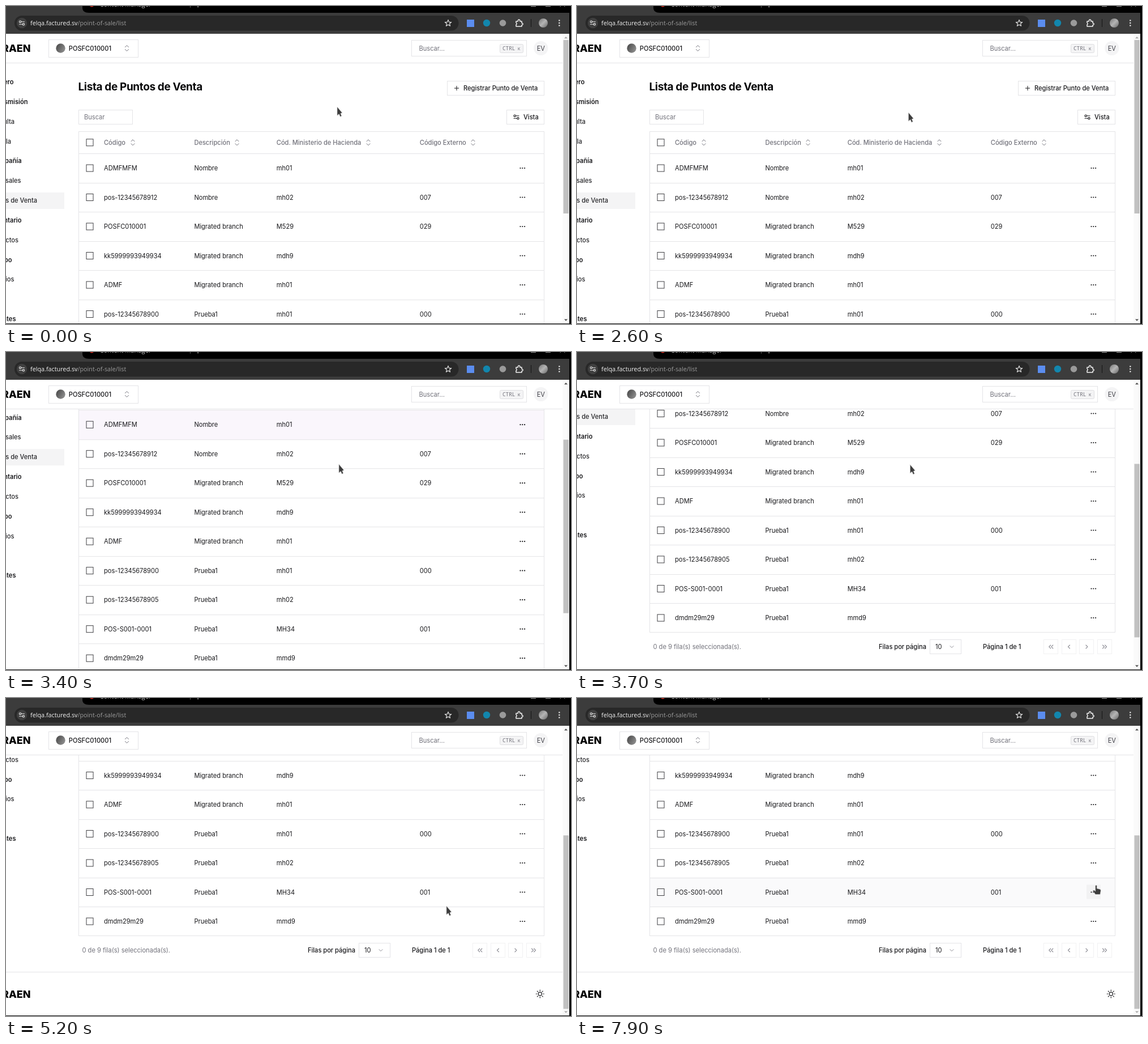
An HTML page for the animation above (8 s loop, 998 by 561 pixels).

```html
<!DOCTYPE html>
<html lang="es">
<head>
<meta charset="utf-8">
<title>Lista de Puntos de Venta</title>
<style>
  html, body { margin: 0; width: 100%; height: 100%; overflow: hidden; background: #fff; }
  svg { display: block; width: 998px; height: 561px; }
  text { font-family: Inter, "Liberation Sans", sans-serif; font-optical-sizing: none; white-space: pre; }
</style>
</head>
<body>
<svg id="stage" viewBox="0 0 998 561" xmlns="http://www.w3.org/2000/svg">
  <defs>
    <clipPath id="view"><rect y="100" width="983" height="460"/></clipPath>
    <linearGradient id="ball" x2="1" y2=".6"><stop stop-color="#444"/><stop offset="1" stop-color="#8c8c8c"/></linearGradient>
    <linearGradient id="photo" x2="1" y2="1"><stop stop-color="#777"/><stop offset=".5" stop-color="#b4b4b4"/><stop offset="1" stop-color="#666"/></linearGradient>
  </defs>
  <rect width="998" height="561" fill="#fff"/>
  <g clip-path="url(#view)"><g id="page"></g></g>
  <g id="header"></g>
  <g id="bar"></g>
  <g id="browser"></g>
  <g id="arrow"><path d="M0 0V15.2L3.3 12.4L5.4 17.2L7.8 16.1L5.9 11.6L8.9 10.6Z" fill="#3c3c3c" stroke="#d0d0d0" stroke-width=".6"/></g>
  <g id="hand"><path d="M-1.3 1.2Q0-.8 1.3 1.2V6L7 7.4Q8.4 8 8.2 10L7 16.5H-1.2L-5.6 10.6Q-5.4 8.6-3.4 9.2L-1.3 11Z" fill="#3c3c3c" stroke="#d0d0d0" stroke-width=".6"/></g>
</svg>
<script>
const NS = 'http://www.w3.org/2000/svg';
const $ = id => document.getElementById(id);
const INK = '#18181b', MUTED = '#71717a', FAINT = '#8e8e96', LINE = '#e4e4e7', SIZE = 11.09;
const LOOP = 8000, STEP = 100;
let layer;

function add(tag, attrs, str) {
  const el = document.createElementNS(NS, tag);
  for (const k in attrs) el.setAttribute(k, attrs[k]);
  if (str !== undefined) el.textContent = str;
  return layer.appendChild(el);
}
// Text placed by the middle of its capitals
function text(x, mid, str, { size = SIZE, fill = INK, weight = 400, anchor = 'start', ...rest } = {}) {
  return add('text', { x, y: mid + size * 0.364, 'font-size': size, fill, 'font-weight': weight, 'text-anchor': anchor, ...rest }, str);
}
const rect = (x, y, width, height, fill, rx = 0) => add('rect', { x, y, width, height, fill, rx });
const box = (x, y, width, height, stroke = LINE, fill = '#fff', rx = 0) =>
  add('rect', { x: x + .5, y: y + .5, width: width - 1, height: height - 1, fill, stroke, rx });
const disc = (cx, cy, r, fill) => add('circle', { cx, cy, r, fill });
const line = (d, stroke = INK, width = 1) =>
  add('path', { d, fill: 'none', stroke, 'stroke-width': width, 'stroke-linecap': 'round', 'stroke-linejoin': 'round' });
const sorter = (x, y) => line(`M${x - 3} ${y - 2}l3-3l3 3M${x - 3} ${y + 2}l3 3l3-3`, MUTED);
const sliders = (x, y, color) => {
  line(`M${x - 1} ${y - 2.3}h5.5M${x - 4.5} ${y + 2.3}h5.5`, color, 1.1);
  for (const s of [-1, 1]) add('circle', { cx: x + 2.9 * s, cy: y + 2.3 * s, r: 1.7, fill: 'none', stroke: color, 'stroke-width': 1.1 });
};
const wordmark = mid => text(43.5, mid, 'LUMBRAEN', { size: 18, weight: 800, anchor: 'end', fill: '#000' });

// Page, scrolls under the header
const ROW_TOP = 260.5, ROW = 51.5, COLS = [173, 332.4, 477.8, 730.8];
const rows = [
  ['ADMFMFM', 'Nombre', 'mh01', ''],
  ['pos-12345678912', 'Nombre', 'mh02', '007'],
  ['POSFC010001', 'Migrated branch', 'M529', '029'],
  ['kk5999993949934', 'Migrated branch', 'mdh9', ''],
  ['ADMF', 'Migrated branch', 'mh01', ''],
  ['pos-12345678900', 'Prueba1', 'mh01', '000'],
  ['pos-12345678905', 'Prueba1', 'mh02', ''],
  ['POS-S001-0001', 'Prueba1', 'MH34', '001'],
  ['dmdm29m29', 'Prueba1', 'mmd9', '']
];
const nav = [
  ['Tablero', 13.5, 1], ['Transmisión', 38.5, 1], ['Consulta', 15], ['Plantilla', 9], ['Compañía', 27.5, 1],
  ['Sucursales', 26.5], ['Puntos de Venta', 55], ['Inventario', 27.5, 1], ['Productos', 22], ['Equipo', 10.5, 1],
  ['Servicios', 14.5], ['', 0], ['Clientes', 17.5, 1]
];

layer = $('page');
rect(0, 329, 103, 29, '#f4f4f5');
nav.forEach(([name, right, strong], i) =>
  text(right, 134 + 34.83 * i, name, { weight: strong ? 600 : 500, anchor: 'end', fill: strong ? INK : '#27272a' }));

text(127.5, 142, 'Lista de Puntos de Venta', { size: 19, weight: 700, 'letter-spacing': '-.02em', fill: '#09090b' });
box(779, 132, 172, 26);
line('M792.3 145h7.4M796 141.3v7.4');
text(808, 145, 'Registrar Punto de Venta', { weight: 500 });
box(128, 183, 96, 26);
text(138, 196.3, 'Buscar', { fill: MUTED });
box(884, 183, 67, 26);
sliders(901.5, 196, INK);
text(914, 196, 'Vista', { weight: 500 });

const hover = rect(129, 0, 822, ROW, '#fafafa');
const hotButton = rect(900, 329.5 + 304, 25, 25, '#f2f2f3');
const check = y => box(141.5, y - 6.5, 13, 13, '#3f3f42', 'none');
check(240.8);
[['Código', 224], ['Descripción', 408], ['Cód. Ministerio de Hacienda', 640], ['Código Externo', 825]].forEach(([name, x], i) => {
  text(COLS[i], 240.8, name, { weight: 500, fill: MUTED });
  sorter(x, 240.8);
});
rows.forEach((cells, i) => {
  const y = 286 + ROW * i;
  rect(128, Math.round(ROW_TOP + ROW * i - .4), 823, 1, LINE);
  check(y);
  cells.forEach((c, k) => text(COLS[k], y, c));
  for (const d of [-3.8, 0, 3.8]) disc(912.3 + d, y, 1.1, INK);
});
box(128, 221, 823, 503, LINE, 'none');

text(134.5, 749, '0 de 9 fila(s) seleccionada(s).', { fill: MUTED });
text(533, 749, 'Filas por página', { weight: 500 });
box(623, 736, 56, 26);
text(633, 749, '10');
line('M659 747.6l3 3l3-3', FAINT);
text(717, 749, 'Página 1 de 1', { weight: 500 });
[837.3, 869, 900.4, 932].forEach((x, i) => {
  box(Math.round(x - 13), 736, 26, 26, '#f1f1f2');
  const s = i < 2 ? 1 : -1;
  const shifts = i % 3 ? [0] : [-2, 2];
  for (const d of shifts) line(`M${x + d + 1.5 * s} 746l${-3 * s} 3l${3 * s} 3`, FAINT, 1.1);
});
rect(0, 787, 983, 1, LINE);
wordmark(826);
add('circle', { cx: 943.3, cy: 826, r: 3.1, fill: 'none', stroke: INK, 'stroke-width': 1.2 });
for (let i = 0; i < 8; i++) {
  const c = Math.cos(i * Math.PI / 4), s = Math.sin(i * Math.PI / 4);
  line(`M${943.3 + 5.6 * c} ${826 + 5.6 * s}L${943.3 + 7 * c} ${826 + 7 * s}`, INK, 1.2);
}

// Fixed header
layer = $('header');
rect(0, 49, 983, 51, '#fff');
rect(0, 100, 983, 1, LINE);
wordmark(74.7);
box(75, 59, 159, 32);
disc(96.5, 74.5, 8.2, 'url(#ball)');
text(110.8, 74.5, 'POSFC010001', { weight: 500 });
sorter(213.5, 74.5);
box(716, 60, 204, 29);
text(729.5, 74.5, 'Buscar...', { fill: MUTED });
box(872, 67, 42, 16, '#dedee1', '#f4f4f5', 2);
const mono = { weight: 500, fill: MUTED, style: 'font-family:"Noto Sans Mono","DejaVu Sans Mono",monospace' };
text(877, 74.8, 'CTRL', { size: 9.3, ...mono });
text(904, 74.8, 'K', { size: 7.6, ...mono });
disc(944.8, 74.5, 12.6, '#f4f4f5');
text(944.8, 74.5, 'EV', { anchor: 'middle', fill: '#3f3f46' });

// Scrollbar
layer = $('bar');
rect(983, 49, 12, 511, '#fafafa');
const thumb = rect(984.5, 60, 9.5, 306, '#c1c1c1');
const up = add('path', { d: 'M986 57.3l3-3.4l3 3.4z' });
const down = add('path', { d: 'M986 552.4l3 3.4l3-3.4z' });

// Browser frame
layer = $('browser');
rect(0, 0, 998, 49, '#3c3c3c');
add('path', { d: 'M135 0H998V12H147Q135 12 135 3Z', fill: '#000' });
const ui = { size: 11.2, fill: '#c8c8c8', style: 'font-family:"Open Sans","Noto Sans",sans-serif' };
text(23, -3.6, 'Lumbraen', { ...ui, anchor: 'end' });
text(165.5, -2.6, 'Content Manager', ui);
disc(151.5, -1.8, 3.6, '#c5281c');
rect(325, 0, 1, 3, '#555');
rect(338.5, 0, 1.2, 2.5, '#bbb');
for (const x of [931, 957]) rect(x - 4, 0, 9, 1, '#999');
line('M979 1l2-2M987 1l-2-2', '#999');
rect(15, 17, 784.5, 26.5, '#282828', 13.2);
disc(28, 30, 9.2, '#3f3f3f');
sliders(28, 30, '#e3e3e3');
const addr = text(43, 30, '', { ...ui, size: 10.8, fill: '#9b9b9b' });
layer = addr;
add('tspan', { fill: '#f1f1f1' }, 'felqa.factured.sv');
add('tspan', {}, '/point-of-sale/list');
layer = $('browser');
let star = '';
for (let i = 0; i < 10; i++) {
  const r = i % 2 ? 2.6 : 6, a = i * Math.PI / 5;
  star += `${i ? 'L' : 'M'}${781 + r * Math.sin(a)} ${30.4 - r * Math.cos(a)}`;
}
line(star + 'Z', '#dedede', 1.2);
rect(814, 24, 13, 13, '#5b8def');
disc(849, 30, 6.2, '#1286ad');
disc(877.5, 30, 5.8, '#9a9a9a');
line('M901 27h3.4v-1.3a1.7 1.7 0 0 1 3.4 0V27H911v3.2h.5a1.6 1.6 0 0 1 0 3.2H911V36H901v-3a2 2 0 0 0 0-3.6Z', '#f0f0f0', 1.5);
rect(927, 23, 1, 14, '#161616');
disc(949, 30, 8, 'url(#photo)');
for (const d of [-4.5, 0, 4.5]) disc(977.3, 30 + d, 1.3, '#e3e3e3');
rect(995, 0, 3, 561, '#000');
rect(0, 560, 998, 1, '#111');

// Motion: [ms, values...]
const scrollKeys = [
  [2600, 0], [2700, 8], [2800, 29], [2900, 52], [3000, 74.5], [3400, 157.8], [3700, 229],
  [3900, 275], [4000, 293], [4100, 302.5], [4200, 304]
];
const mouseKeys = [
  [0, 585, 178], [2000, 585, 181], [2600, 585.5, 188], [3000, 587, 193], [3400, 588, 198], [4100, 589, 199.5],
  [4600, 589, 200], [4800, 628, 236], [5000, 704, 308], [5200, 778, 367], [5400, 880, 355],
  [5600, 914, 338], [6500, 916, 333], [7900, 917, 330]
];

function at(keys, t) {
  const i = keys.findIndex(k => k[0] > t);
  if (i === 0) return keys[0].slice(1);
  if (i < 0) return keys[keys.length - 1].slice(1);
  const a = keys[i - 1], b = keys[i], p = (t - a[0]) / (b[0] - a[0]);
  return a.slice(1).map((v, k) => v + (b[k + 1] - v) * p);
}
const show = (el, on) => el.setAttribute('visibility', on ? 'visible' : 'hidden');

function draw(t) {
  const [y] = at(scrollKeys, t);
  const [mx, my] = at(mouseKeys, t);
  $('page').setAttribute('transform', `translate(0 ${-y})`);
  thumb.setAttribute('y', 60 + y * 0.6);
  up.setAttribute('fill', y > 0 ? '#505050' : '#a8a8a8');
  down.setAttribute('fill', y < 304 ? '#505050' : '#a8a8a8');

  const first = t >= 3100 && t < 3500, onMenu = t >= 5500;
  show(hover, first || onMenu);
  hover.setAttribute('y', ROW_TOP + (first ? 0 : 7 * ROW));
  hover.setAttribute('fill', first ? '#faf6fc' : '#fafafb');
  show(hotButton, onMenu);
  show($('hand'), onMenu);
  show($('arrow'), !onMenu);
  for (const id of ['hand', 'arrow']) $(id).setAttribute('transform', `translate(${mx} ${my})`);
}

const start = performance.now();
function tick() {
  const t = (performance.now() - start) % LOOP;
  draw(Math.floor(t / STEP) * STEP);
  requestAnimationFrame(tick);
}
tick();
</script>
</body>
</html>
```
